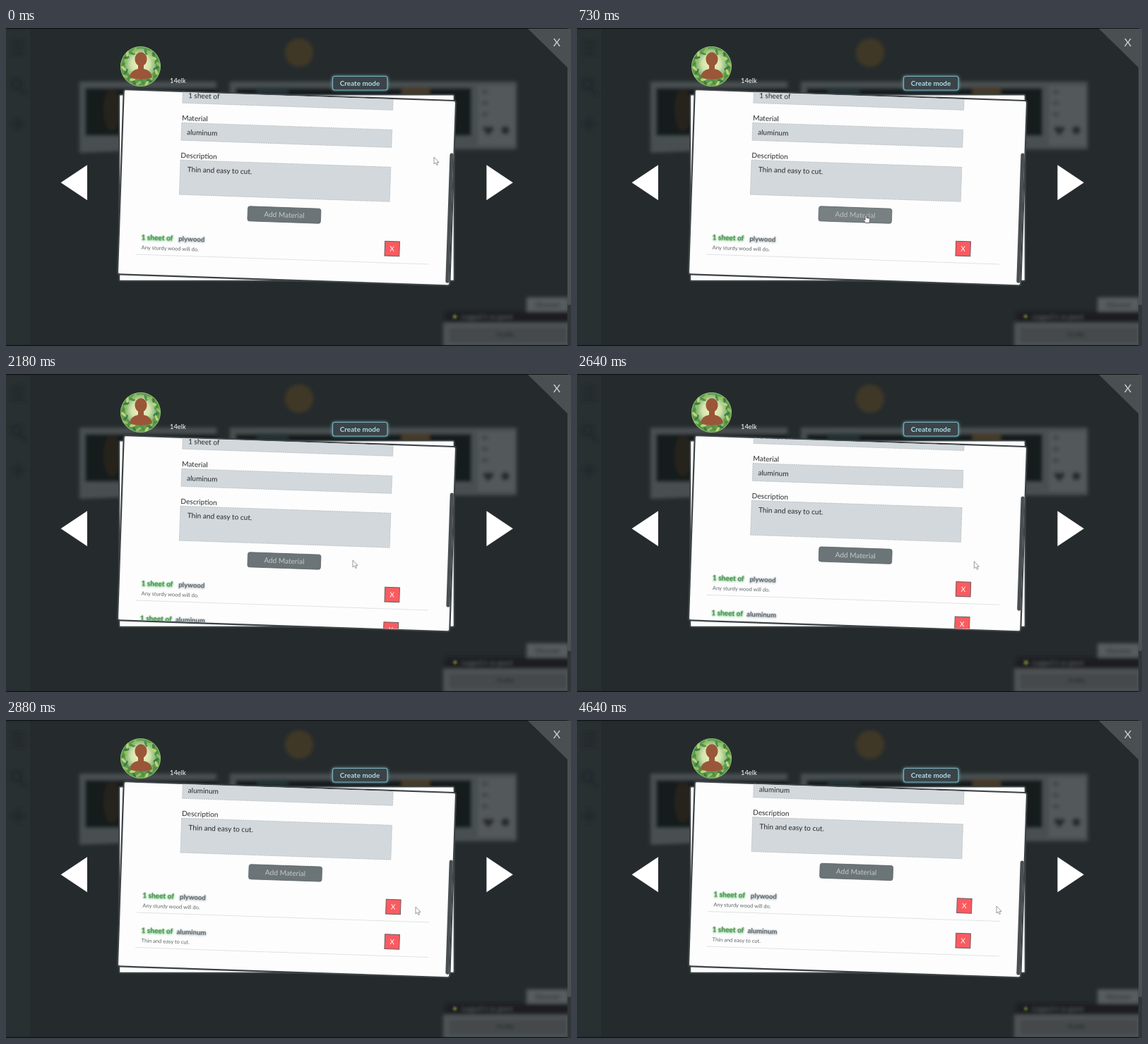
Recreate the animation shown at these times as an HTML page. Size 800 px wide and 451 px high, loop 4670 ms.

```html
<!DOCTYPE html>
<html lang="en">
<head>
<meta charset="utf-8">
<title>Material list</title>
<style>
html, body { margin: 0; width: 100%; height: 100%; overflow: hidden; background: #252b2d; }
svg { display: block; width: 800px; height: 451px; }
text { font: 10.1px Lato, "Open Sans", sans-serif; fill: #25292b; }
.mid { text-anchor: middle; }
.small { font-size: 7.55px; fill: #60666a; }
.field { fill: #d3d8dc; stroke: #b0b7bb; stroke-width: .8; stroke-dasharray: 2 1.2; }
.amount { font-weight: bold; fill: #5c8f62; text-shadow: 0 0 2px #62c46c, 0 1px 3px #4fb85c; }
.name { font-size: 9.6px; font-weight: bold; fill: #5d676d; text-shadow: 0 0 3px #a2abb0, 0 1px 3px #b4bbbf; }
.glow { filter: drop-shadow(0 0 2px #5fa9bb); }
.dim text { fill: #1d2224; font-size: 9px; }
</style>
</head>
<body>
<svg viewBox="0 0 800 451">
  <defs>
    <filter id="blur" x="-20%" y="-20%" width="140%" height="140%"><feGaussianBlur stdDeviation="2.4"/></filter>
    <radialGradient id="sky">
      <stop offset="0" stop-color="#f6f5c8"/><stop offset=".6" stop-color="#d3e3ac"/><stop offset="1" stop-color="#7fb574"/>
    </radialGradient>
    <clipPath id="page"><rect x="-234" y="-130" width="468" height="260"/></clipPath>
    <clipPath id="round"><circle cx="190.5" cy="54.5" r="28.5"/></clipPath>
  </defs>

  <rect width="800" height="451" fill="#252b2d"/>
  <rect width="34" height="451" fill="#293032"/>
  <g class="dim" filter="url(#blur)">
    <g fill="none" stroke="#20262a" stroke-width="4">
      <path d="M8 20h19M8 28h19M8 36h19M21 87l7 8M17 127v18M8 136h18"/>
      <circle cx="15" cy="80" r="7"/>
    </g>
    <circle cx="415" cy="35" r="20" fill="#3f3828"/>
    <path d="M104 76H298V169L104 177Z M317 76H723V172H317Z" fill="#4a4f51"/>
    <path d="M112 85H298V153H112Z M325 85H659V153H325Z" fill="#171d1f"/>
    <ellipse cx="150" cy="116" rx="12" ry="30" fill="#25231c"/>
    <rect x="355" y="84" width="45" height="10" fill="#203335"/>
    <rect x="560" y="84" width="40" height="12" fill="#463a26"/>
    <path d="M668 82H721V166H668Z" fill="#53585a"/>
    <g fill="#25292b">
      <path d="M683 153l-8-9q1-7 8-3q7-4 8 3Z"/><circle cx="707" cy="145" r="6"/>
    </g>
    <path d="M674 88h8v5h-8zM674 104h8v5h-8zM674 120h8v5h-8z" fill="#3d4244"/>
    <rect x="622" y="402" width="175" height="16" fill="#1a1f21"/>
    <rect x="737" y="382" width="60" height="20" fill="#575c5e"/>
    <rect x="619" y="418" width="181" height="36" fill="#4d5254"/>
    <rect x="628" y="425" width="166" height="21" fill="#44494b"/>
    <text x="767" y="396" class="mid">Discover</text>
    <text x="707" y="438" class="mid">Profile</text>
    <text x="645" y="413" style="fill:#596063">Logged in as guest</text>
  </g>
  <path id="star" d="M0-5L1.5-1.5L5-1L2.3 1.5L3 5L0 3L-3 5L-2.3 1.5L-5-1L-1.5-1.5Z" fill="#67722f" style="filter:blur(1.2px)"/>
  <path d="M0 0H800V1.2H0ZM0 449.8H800V451H0Z" fill="#0f1314"/>
  <rect x="795" y="0" width="5" height="451" fill="#303638"/>
  <rect x="795" y="48" width="5" height="345" rx="2" fill="#4b5153"/>
  <path d="M739 1H800V61Z" fill="#4a5052"/>
  <text x="780" y="25.5" class="mid" style="font-size:16px;fill:#cdd0d2">X</text>

  <path d="M77.6 219.3L115 194.3V244.3Z M717.8 219.3L680.4 194.3V244.3Z" fill="#fff"/>

  <g clip-path="url(#round)">
    <circle cx="190.5" cy="54.5" r="28.5" fill="#5f9a50"/>
    <circle cx="190.5" cy="51" r="22" fill="url(#sky)"/>
    <g id="leaves"></g>
    <path d="M175 70Q176 60 187 58V53A8.5 10 0 1 1 195 53V58Q206 60 207 70Q191 76 175 70Z" fill="#9a5638"/>
  </g>
  <circle cx="190.5" cy="54.5" r="28" fill="none" stroke="#8fbf70"/>
  <text x="232" y="78" style="fill:#fff;font-size:9.3px">14elk</text>

  <g class="glow">
    <rect x="462.5" y="68.5" width="77.5" height="19.5" rx="3" fill="#3b4347" stroke="#7fb0bc" stroke-width="1.2"/>
  </g>
  <text x="501" y="81.8" class="mid" style="fill:#a9dbe7;font-size:9.9px;font-weight:bold">Create mode</text>

  <rect x="160.2" y="94.4" width="474.5" height="264.4" rx="2" fill="#fcfcfc" stroke="#3d4346" stroke-width="2"/>
  <g transform="translate(397.5 226) rotate(1.95)">
    <rect x="-235.3" y="-131" width="470.6" height="262.4" rx="3" fill="#fdfdfd" stroke="#3d4346" stroke-width="2.2"/>
    <g clip-path="url(#page)">
      <g id="content">
        <rect class="field" x="-151.7" y="-139.6" width="298" height="25"/>
        <text x="-143.8" y="-122">1 sheet of</text>
        <text x="-151.7" y="-89.8">Material</text>
        <rect class="field" x="-151.7" y="-86.6" width="298" height="25"/>
        <text x="-144" y="-69.8">aluminum</text>
        <text x="-151.5" y="-36.8">Description</text>
        <rect class="field" x="-151.7" y="-33.7" width="298" height="49"/>
        <text x="-141.5" y="-17.1">Thin and easy to cut.</text>
        <rect id="add" x="-54" y="28.6" width="103.5" height="21" rx="3" stroke="#5c6468" stroke-width=".8"/>
        <text id="label" x="-2.3" y="42.7" class="mid">Add Material</text>
        <g id="rows"></g>
      </g>
    </g>
    <rect id="thumb" x="229.2" width="5.2" rx="2.6" fill="#484e51"/>
  </g>

  <path id="arrow" d="M0 0V10L2.4 8L4 11.6L5.6 10.8L4 7.4H7Z" fill="#fff" stroke="#7d8285" stroke-width=".8"/>
  <path id="hand" d="M-1 .8Q0-.6 1 .8V4.2L4.8 5Q6 5.4 5.8 7L5 11.5H-.2L-3.4 7.4Q-3.2 5.8-1 7.4Z" fill="#fff" stroke="#3d4144" stroke-width=".8"/>
</svg>
<script>
const LOOP = 4670, ADDED = 910, PITCH = 49.6, VIEW = 257;
const $ = id => document.getElementById(id);
const set = (id, attrs) => { for (const k in attrs) $(id).setAttribute(k, attrs[k]); };

const row = (name, note, x, i) => `<g id="row${i}" transform="translate(0 ${i * PITCH})">
  <text class="amount" x="-203.3" y="81.1">1 sheet of</text>
  <text class="name" x="${x}" y="81.3">${name}</text>
  <text class="small" x="-202.8" y="94.8">${note}</text>
  <path d="M-211 102.2H204" stroke="#e0e2e4"/>
  <rect x="141.7" y="71.5" width="20.8" height="20.8" fill="#fa5b60" stroke="#6b5a5e"/>
  <text class="mid" x="152" y="85.6" style="fill:#fff">X</text></g>`;
$("rows").innerHTML = row("plywood", "Any sturdy wood will do.", -150.7, 0)
  + row("aluminum", "Thin and easy to cut.", -153.4, 1);

const greens = ["#4f8f48", "#93c05c", "#3f7a48", "#bcd470"];
$("leaves").innerHTML = Array.from({ length: 26 }, (_, i) => {
  const turn = 20 + i * 12.8;
  return `<ellipse rx="4.5" ry="1.8" fill="${greens[i % 4]}" transform="translate(190.5 54.5) rotate(${turn - 90}) translate(${22 + i % 3 * 2}) rotate(${i % 2 ? 50 : -40})"/>`;
}).join("");

const ramp = (t, a, b) => Math.min(1, Math.max(0, (t - a) / (b - a)));
const ease = u => u * u * (3 - 2 * u);

// time, x, y of the pointer tip
const path = [[0, 606, 183], [580, 409, 265], [1210, 409, 265], [1720, 472, 263], [2180, 491, 264],
  [2300, 493, 264], [2730, 571, 266], [2880, 580, 265], [4500, 580, 265], [4640, 594, 264]];

function pointer(t) {
  const i = path.findIndex(p => p[0] > t);
  if (i < 0) return path[path.length - 1].slice(1);
  const [t0, x0, y0] = path[i - 1], [t1, x1, y1] = path[i];
  const u = ease(ramp(t, t0, t1));
  return [x0 + (x1 - x0) * u, y0 + (y1 - y0) * u];
}

function draw(t) {
  const added = t >= ADDED;
  const scroll = 49 * ease(ramp(t, 2550, 2910)) + .6 * ramp(t, 3290, 3370);
  const total = 361 + (added ? PITCH : 0);
  set("content", { transform: `translate(0 ${-scroll})` });
  set("row1", { visibility: added ? "visible" : "hidden" });
  set("thumb", { y: -130.5 + (104 + scroll) * VIEW / total, height: VIEW * VIEW / total + 1.5 });

  const [x, y] = pointer(t);
  const hover = x > 342 && x < 446 && y > 252 && y < 278;
  const place = `translate(${x} ${y})`;
  set("arrow", { transform: place, visibility: hover ? "hidden" : "visible" });
  set("hand", { transform: place, visibility: hover ? "visible" : "hidden" });
  set("add", { fill: hover ? "#788081" : "#6b7477" });
  $("label").style.fill = hover ? "#bdc1c3" : "#c6cacc";

  const live = Math.min(t, 3060);
  set("star", { transform: `translate(635.5 409) rotate(${live * .12}) scale(${.85 + .12 * Math.sin(live / 180)})` });
}

function tick() {
  draw(performance.now() % LOOP);
  requestAnimationFrame(tick);
}
tick();
</script>
</body>
</html>
```
